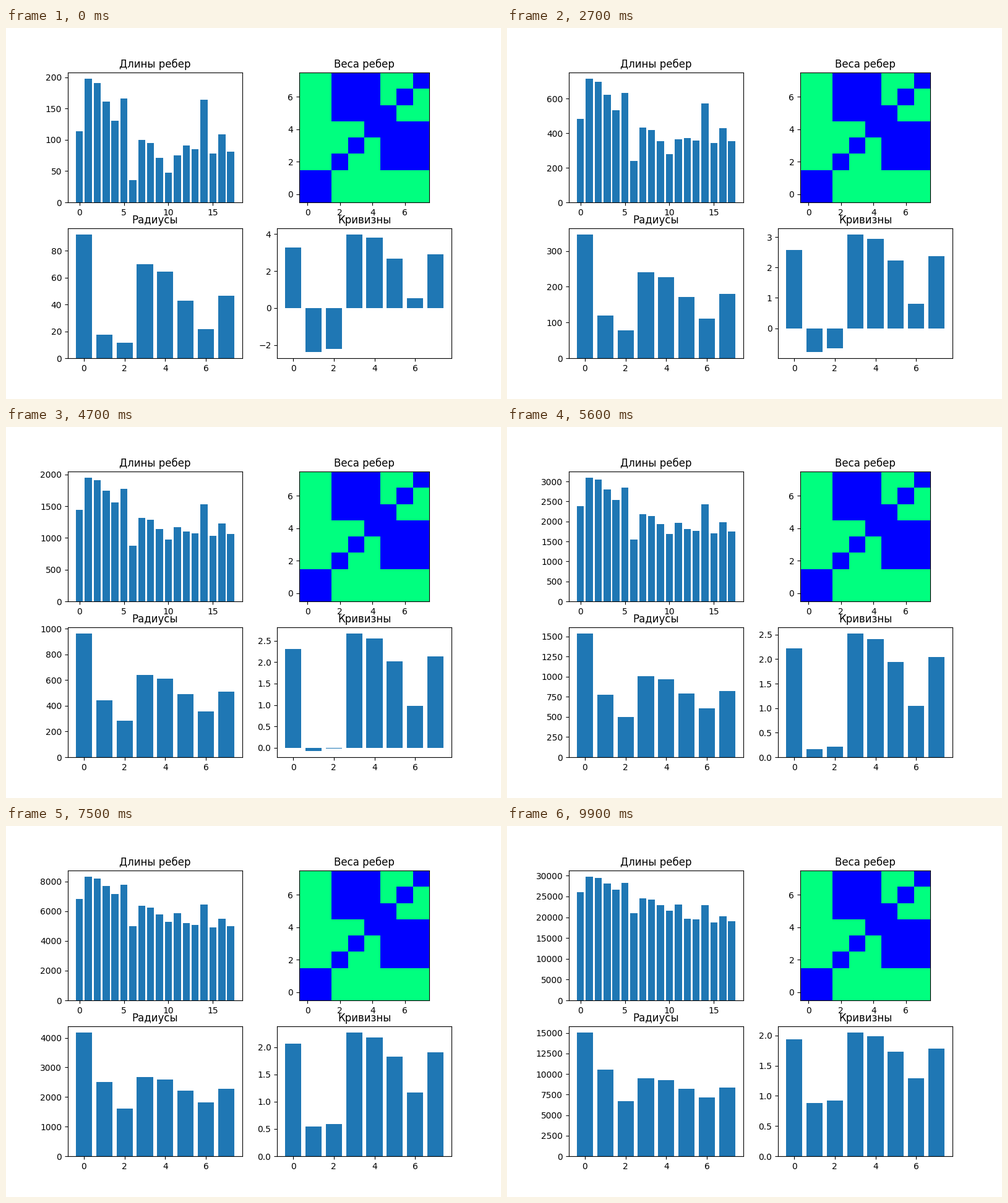
A matplotlib script for the animation above (10 s loop, 800 px wide and 600 px high).

```python
import matplotlib.pyplot as plt
import numpy as np
from matplotlib.animation import FuncAnimation

FRAMES = 100
DT = 0.5 / (FRAMES - 1)
START = [92.2, 17.45, 11.58, 69.9, 64.4, 42.9, 21.7, 46.4]
WEIGHT = 2

# Two triangles, each joined to both apexes 0 and 1.
RINGS = [(2, 3, 4), (5, 6, 7)]
SIDES = [(a, b) for r in RINGS for a, b in ((r[0], r[1]), (r[0], r[2]), (r[1], r[2]))]
EDGES = [(apex, v) for apex in (0, 1) for v in range(2, 8)] + SIDES
FACES = [(apex, a, b) for apex in (0, 1) for a, b in SIDES]

weights = np.zeros((8, 8))
for i, j in EDGES:
    weights[i, j] = weights[j, i] = WEIGHT


def length(r, i, j):
    return np.sqrt(r[i] ** 2 + r[j] ** 2 + 2 * WEIGHT * r[i] * r[j])


def curvature(r):
    k = np.full(8, 2 * np.pi)
    for a, b, c in FACES:
        for p, q, s in ((a, b, c), (b, c, a), (c, a, b)):
            u, v, w = length(r, p, q), length(r, p, s), length(r, q, s)
            cos = (u * u + v * v - w * w) / (2 * u * v)
            k[p] -= np.arccos(np.clip(cos, -1, 1))
    return k


def flow(log_r):
    return 4 * np.pi - curvature(np.exp(log_r))


def solve():
    """Ricci flow of the log radii, integrated with RK4."""
    x = np.log(START)
    path = [x]
    for _ in range(FRAMES - 1):
        k1 = flow(x)
        k2 = flow(x + DT / 2 * k1)
        k3 = flow(x + DT / 2 * k2)
        k4 = flow(x + DT * k3)
        x = x + DT / 6 * (k1 + 2 * k2 + 2 * k3 + k4)
        path.append(x)
    return np.exp(path)


radii = solve()
fig, ((ax_len, ax_weight), (ax_rad, ax_curv)) = plt.subplots(2, 2, figsize=(8, 6), dpi=100)
ax_weight.imshow(weights, origin="lower", cmap="winter")
ax_weight.set_title("Веса ребер")


def bars(ax, values, title):
    ax.clear()
    ax.bar(range(len(values)), values)
    ax.set_title(title)


def update(n):
    r = radii[n]
    bars(ax_len, [length(r, i, j) for i, j in EDGES], "Длины ребер")
    bars(ax_rad, r, "Радиусы")
    bars(ax_curv, curvature(r), "Кривизны")


anim = FuncAnimation(fig, update, frames=FRAMES, interval=100, repeat=True, repeat_delay=0)
plt.show()
```
